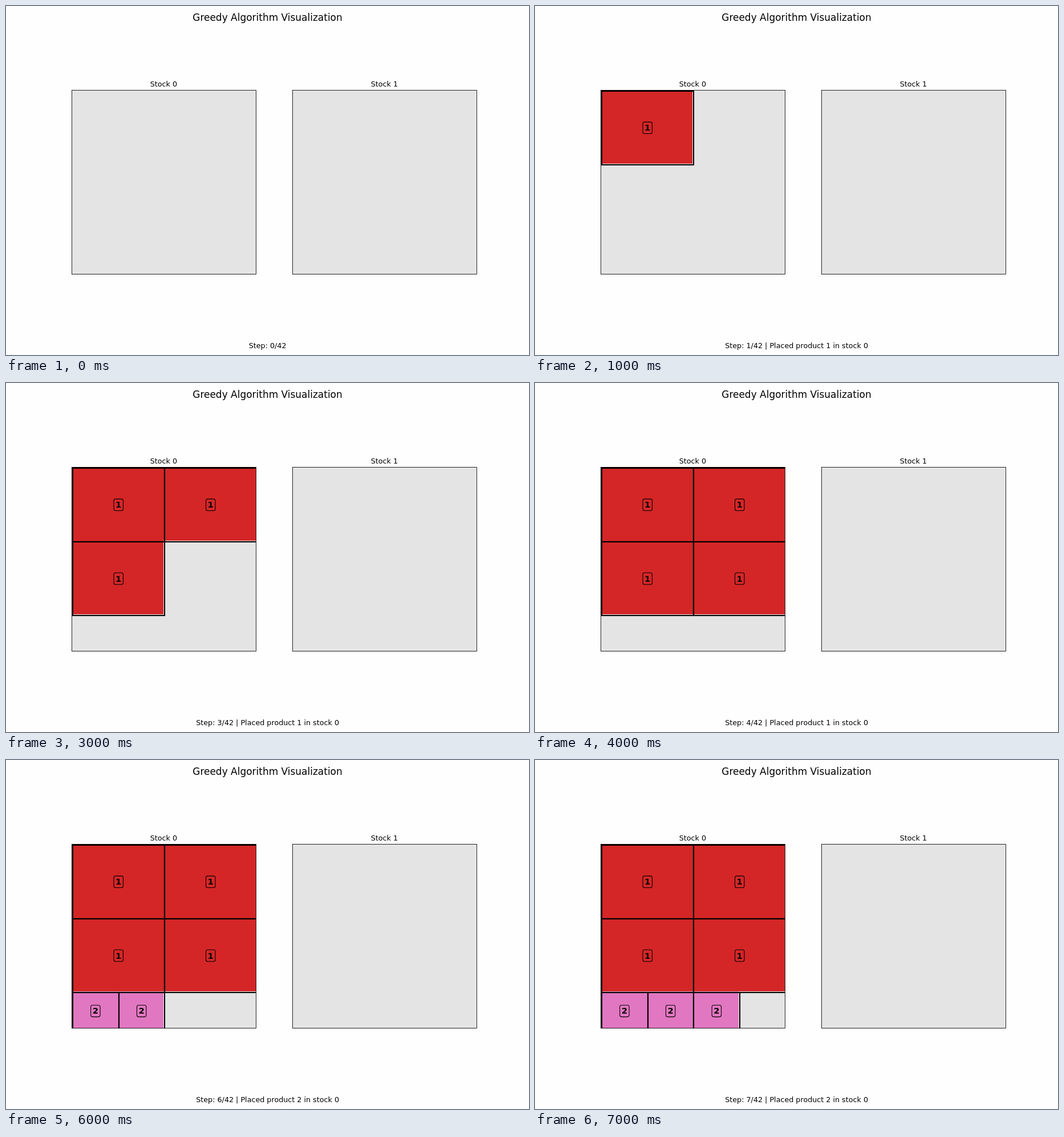
Write an HTML page with a canvas that moves like this. It is 917 by 611 pixels and loops after 8 s.

```html
<!DOCTYPE html>
<html lang="en">
<head>
<meta charset="utf-8">
<title>Greedy Algorithm Visualization</title>
<style>
  html, body { margin: 0; width: 100%; height: 100%; overflow: hidden; background: #fefefe; }
  canvas { display: block; }
</style>
</head>
<body>
<canvas id="stage" width="917" height="611"></canvas>
<script>
const ctx = document.getElementById('stage').getContext('2d');
const FONT = '"DejaVu Sans", sans-serif';
const STEP_MS = 1000, STEPS = 8, TOTAL = 42;

// The stock is a 100 x 100 grid; outlines sit half a cell past the fills.
const CELL = 3.23;
const STOCK = { left: 115.2, top: 147, right: 438, bottom: 470 };
const OUTLINE = { x: 116.8, y: 148.7 };
const PRODUCTS = {
  1: { w: 50, h: 40, color: '#d42627' },
  2: { w: 25, h: 20, color: '#e277c1' }
};

const place = (id, col, row) => ({ id, col, row, ...PRODUCTS[id] });
const placements = [];
for (const row of [0, 40]) for (const col of [0, 50]) placements.push(place(1, col, row));
for (const col of [0, 25, 50]) placements.push(place(2, col, 80));

function text(str, x, baseline, size, weight = '') {
  ctx.font = `${weight} ${size}px ${FONT}`;
  ctx.textAlign = 'center';
  ctx.fillStyle = '#000';
  ctx.fillText(str, x, baseline);
}

function fillBox(x0, y0, x1, y1, color) {
  ctx.fillStyle = color;
  ctx.fillRect(x0, y0, x1 - x0, y1 - y0);
}

function drawFill({ id, col, row, w, h, color }) {
  const px = c => Math.floor(STOCK.left + c * CELL);
  const py = r => Math.floor(STOCK.top + r * CELL);
  const x0 = px(col), y0 = py(row), x1 = px(col + w), y1 = py(row + h);
  fillBox(x0, y0, x1 + 1, y1 + 1, '#fff');
  fillBox(x0, y0, x1, y1, color);
  if (id === 2) fillBox(x0, y0, x1, y0 + 1, '#f4c4e3');
}

function drawOutline({ col, row, w, h }) {
  const px = c => Math.round(OUTLINE.x + c * CELL);
  const py = r => Math.round(OUTLINE.y + r * CELL);
  const x = px(col), y = py(row);
  ctx.strokeStyle = '#000';
  ctx.lineWidth = 2.12;
  ctx.strokeRect(x, y, px(col + w) - x, py(row + h) - y);
}

function drawLabel({ id, col, row, w, h }) {
  const x = OUTLINE.x + (col + w / 2) * CELL - 0.3;
  const y = OUTLINE.y + (row + h / 2) * CELL;
  ctx.lineWidth = 1.06;
  ctx.beginPath();
  ctx.roundRect(x - 8.2, y - 10.2, 16.4, 20.4, 3);
  ctx.stroke();
  text(id, x, y + 5, 14.85, 'bold');
}

function drawStock(left, right, label, placed) {
  fillBox(left, 147, right, 470, '#e4e4e4');
  ctx.save();
  ctx.beginPath();
  ctx.rect(left, 147, right - left, 323);
  ctx.clip();
  placed.forEach(drawFill);
  placed.forEach(drawOutline);
  placed.forEach(drawLabel);
  ctx.restore();
  ctx.strokeStyle = '#000';
  ctx.lineWidth = 0.85;
  ctx.strokeRect(left + 0.5, 147.5, right - left, 322);
  text(label, (left + right) / 2 - 0.2, 140.7, 12.73);
}

function draw(step) {
  fillBox(0, 0, 917, 611, '#fefefe');
  text('Greedy Algorithm Visualization', 458.5, 26, 16.98);
  drawStock(115, STOCK.right, 'Stock 0', placements.slice(0, step));
  drawStock(502, 825, 'Stock 1', []);
  const note = step ? ` | Placed product ${placements[step - 1].id} in stock 0` : '';
  text(`Step: ${step}/${TOTAL}${note}`, 458.6, 599, 12.73);
}

let start = null;
function tick(now) {
  start ??= now;
  draw(Math.floor((now - start) / STEP_MS) % STEPS);
  requestAnimationFrame(tick);
}
draw(0);
requestAnimationFrame(tick);
</script>
</body>
</html>
```
